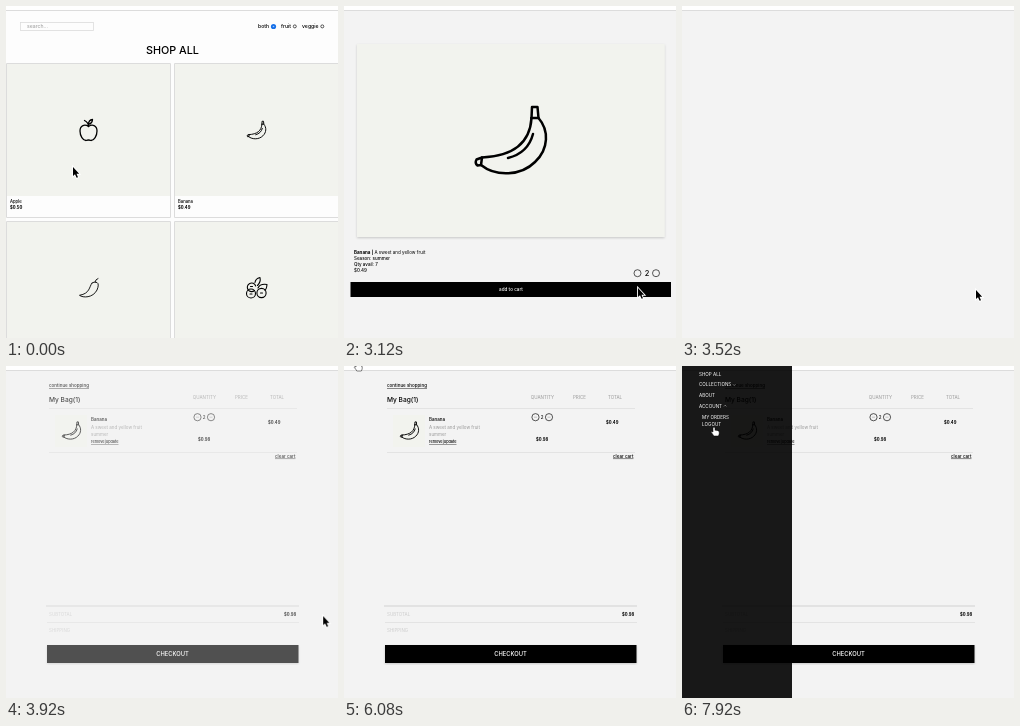
Animation, 332 px wide and 332 px high, one loop 8000 ms. Source, as an HTML page:

```html
<!DOCTYPE html>
<html lang="en">
<head>
<meta charset="utf-8">
<title>Shop walkthrough</title>
<style>
html, body { margin: 0; width: 100%; height: 100%; overflow: hidden; background: #f3f3f3; }
svg { display: block; width: 100vw; height: 100vh; }
text { font-family: Inter, "Liberation Sans", sans-serif; font-size: 4.5px; font-weight: 500; fill: #000; }
.m { text-anchor: middle; }
.b { font-weight: 700; }
.small { font-size: 4.2px; }
.label { font-size: 5.15px; }
.count { font-size: 7.5px; }
.grey { fill: #999; font-weight: 400; }
.pale { fill: #ccc; font-weight: 400; }
.u { text-decoration: underline; }
.white { fill: #fff; }
.menu text { fill: #fff; font-size: 4.6px; font-weight: 400; }
.tile { fill: #f2f3ee; }
.line { fill: none; stroke: #dcdcdc; }
.ring { fill: none; stroke: #111; stroke-width: .7; }
.icon { fill: none; stroke: #000; stroke-linecap: round; stroke-linejoin: round; }

/* One loop lasts 8 s, so 1% is 80 ms. */
.t { animation: 8s linear infinite; }
.home { animation-name: home; animation-timing-function: step-end; }
.product { animation-name: product; }
.cart { animation-name: cart; }
.drawer { animation-name: drawer; }
.menu { animation-name: menu; }
.account, .q0, .q1, .q2, .arrow, .hand { animation-timing-function: step-end; }
.account { animation-name: account; }
.q0 { animation-name: q0; }
.q1 { animation-name: q1; }
.q2 { animation-name: q2; }
.arrow { animation-name: arrow; }
.hand { animation-name: hand; }
.cursor { animation-name: cursor; animation-timing-function: ease-in-out; }

@keyframes home { 0% { opacity: 1 } 12%, 100% { opacity: 0 } }
@keyframes product { 0%, 12% { opacity: 0 } 14%, 40% { opacity: 1 } 43%, 100% { opacity: 0 } }
@keyframes cart { 0%, 45% { opacity: 0 } 51%, 100% { opacity: 1 } }
@keyframes drawer {
  0% { transform: scaleX(0) }
  76.5% { transform: scaleX(0); animation-timing-function: ease }
  82.75%, 100% { transform: scaleX(1) }
}
@keyframes menu { 0%, 78.5% { opacity: 0 } 86%, 100% { opacity: 1 } }
@keyframes account { 0% { opacity: 0 } 95%, 100% { opacity: 1 } }
@keyframes q0 { 0% { opacity: 1 } 27%, 100% { opacity: 0 } }
@keyframes q1 { 0% { opacity: 0 } 27% { opacity: 1 } 30%, 100% { opacity: 0 } }
@keyframes q2 { 0% { opacity: 0 } 30%, 100% { opacity: 1 } }
@keyframes arrow { 0% { opacity: 1 } 72%, 100% { opacity: 0 } }
@keyframes hand { 0% { opacity: 0 } 72%, 100% { opacity: 1 } }
@keyframes cursor {
  0%, 3.5% { transform: translate(67px, 161px) }
  10%, 15% { transform: translate(225px, 139px) }
  18%, 19% { transform: translate(233px, 257px) }
  23% { transform: translate(318px, 252px) }
  25%, 30% { transform: translate(313px, 266px) }
  33%, 39% { transform: translate(294px, 282px) }
  42%, 45% { transform: translate(294px, 284px) }
  51%, 53% { transform: translate(324px, 240px) }
  60%, 62% { transform: translate(197px, 47px) }
  67%, 68% { transform: translate(150px, 28px) }
  73%, 82% { transform: translate(13px, -4px) }
  90% { transform: translate(22px, 8px) }
  94%, 95% { transform: translate(30px, 41px) }
  99%, 100% { transform: translate(32px, 61px) }
}
</style>
</head>
<body>
<svg viewBox="0 0 332 332">
  <defs>
    <g id="banana" transform="translate(-167 -134)">
      <path d="M187.5 112L188 101h5.5l1 11C205 124 205 143 191 156C177 170 152 171 137 159"/>
      <path d="M187.5 112C186 137 170 150 138 151.5"/>
      <path d="M138 151.5L132.5 153.5Q130.5 157 133.5 159.5L137 159Z"/>
      <path d="M187.5 112H194.5M164 152Q184 147 189 128"/>
    </g>
    <filter id="soft" x="-5%" y="-5%" width="110%" height="112%">
      <feDropShadow dx="0" dy="1" stdDeviation="1" flood-opacity=".18"/>
    </filter>
  </defs>

  <rect width="332" height="332" fill="#f3f3f3"/>

  <g class="t home">
    <rect width="332" height="332" fill="#fdfdfd"/>
    <rect class="line" x="14.5" y="16.5" width="73" height="8" stroke-width=".8"/>
    <text class="grey label" x="21" y="22.2">search...</text>
    <text class="label" x="252" y="22.3">both</text>
    <text class="label" x="275" y="22.3">fruit</text>
    <text class="label" x="296" y="22.3">veggie</text>
    <circle cx="267.5" cy="20.5" r="2.6" fill="#1670e8"/>
    <circle cx="267.5" cy="20.5" r=".8" fill="#9cc4fa"/>
    <circle class="ring" cx="288.8" cy="20.4" r="1.5"/>
    <circle class="ring" cx="316.3" cy="20.4" r="1.5"/>
    <text class="m" x="166.5" y="48.2" style="font-size:10.8px">SHOP ALL</text>

    <path class="line" d="M.5 57.5H164.5V211.5H.5ZM168.5 57.5H333V211.5H168.5ZM.5 215.5H164.5V340H.5ZM168.5 215.5H333V340H168.5Z"/>
    <path class="tile" d="M1 58H164V190H1ZM169 58H332V190H169ZM1 216H164V332H1ZM169 216H332V332H169Z"/>
    <text class="small" x="4" y="197.4">Apple</text>
    <text class="small b" x="4" y="203.4">$0.50</text>
    <text class="small" x="172" y="197.4">Banana</text>
    <text class="small b" x="172" y="203.4">$0.49</text>

    <g class="icon" stroke-width="1.3">
      <path d="M82.5 120.5C79 118 74 119 74 125C74 130 77 134.5 80 134.5Q82.5 133.5 85 134.5C88 134.5 91 130 91 125C91 119 86 118 82.5 120.5Q82.5 116.5 78.5 114.5M82.5 118.5Q82.5 114 86.5 113.5Q86.5 117 82.5 118.5"/>
    </g>
    <use class="icon" href="#banana" transform="translate(250.5 124) scale(.265)" stroke-width="3.6"/>
    <g class="icon" stroke-width=".9">
      <path d="M86 277C83 281 84 287.5 73.5 289.3C77 292 87 292 91 284Q93.5 278 91 276.5Q88 275.3 86 277M89 276Q89.5 273.3 92 272.5"/>
    </g>
    <g class="icon" stroke-width="1.1">
      <circle cx="245" cy="287.5" r="4.5"/>
      <circle cx="255.5" cy="287" r="4.6"/>
      <path d="M248.5 284.5A4.3 4.3 0 1 1 249.7 280M249 276.5Q249.5 272.5 254 271.5Q255 276 251.5 279.5M252 282Q254 277.5 261 278.5Q260.5 284 258.5 284M244.5 280.5h2M244 288h2M254.5 287h2"/>
    </g>
  </g>

  <g class="t product">
    <rect class="tile" x="13" y="38" width="307.5" height="193" filter="url(#soft)"/>
    <use class="icon" href="#banana" transform="translate(167 134)" stroke-width="2.5"/>
    <text x="10" y="248.4" style="font-weight:400"><tspan class="b">Banana |</tspan> A sweet and yellow fruit</text>
    <text x="10" y="254.4">Season: summer</text>
    <text x="10" y="260.4">Qty avail: 7</text>
    <text x="10" y="266.4">$0.49</text>
    <circle class="ring" cx="293.5" cy="267.2" r="3.5"/>
    <circle class="ring" cx="312" cy="267.2" r="3.5"/>
    <g class="m">
      <text class="t count q0" x="303" y="270">0</text>
      <text class="t count q1" x="303" y="270">1</text>
      <text class="t count q2" x="303" y="270">2</text>
    </g>
    <rect x="6.5" y="276" width="320.5" height="15"/>
    <text class="m white" x="167" y="285" style="font-size:4.6px">add to cart</text>
  </g>

  <g class="t cart">
    <text class="u" x="43" y="21">continue shopping</text>
    <text x="43" y="36.4" style="font-size:6.6px">My Bag(1)</text>
    <g class="m">
      <text class="grey" x="198.5" y="33.4">QUANTITY</text>
      <text class="grey" x="235.5" y="33.4">PRICE</text>
      <text class="grey" x="271" y="33.4">TOTAL</text>
    </g>
    <path class="line" d="M43 42.5H291M43 86.5H291" stroke-width=".7"/>
    <rect class="tile" x="49" y="49" width="32" height="32"/>
    <use class="icon" href="#banana" transform="translate(65.5 64.5) scale(.26)" stroke-width="3.6"/>
    <text x="85" y="55.4">Banana</text>
    <text class="grey" x="85" y="63.4">A sweet and yellow fruit</text>
    <text class="grey" x="85" y="70.4">summer</text>
    <text class="u" x="85" y="77" style="font-size:3.8px">remove|update</text>
    <circle class="ring" cx="191.5" cy="51.2" r="3.6"/>
    <circle class="ring" cx="205" cy="51.2" r="3.6"/>
    <path class="ring" d="M190 51.2h3M203.5 51.2h3" stroke-opacity=".3"/>
    <text class="m" x="198.2" y="52.8">2</text>
    <text class="small b" x="192" y="75">$0.98</text>
    <text class="small b" x="262" y="58">$0.49</text>
    <text class="u" x="269" y="91.6">clear cart</text>
    <path class="line" d="M40 240H293" stroke-width="1.6"/>
    <path class="line" d="M41 256.5H293" stroke-width=".7"/>
    <text class="pale" x="43" y="249.9">SUBTOTAL</text>
    <text class="pale" x="43" y="266.3">SHIPPING</text>
    <text class="small b" x="278" y="249.9">$0.98</text>
    <rect x="41" y="279" width="251.5" height="18" filter="url(#soft)"/>
    <text class="m white" x="166.5" y="290.2" style="font-size:5.8px">CHECKOUT</text>
  </g>

  <rect width="332" height="4.5" fill="#fff"/>
  <path class="line" d="M0 4.5H332"/>

  <rect class="t drawer" width="110" height="332" fill-opacity=".9"/>
  <g class="t menu">
    <text x="17" y="9.7">SHOP ALL</text>
    <text x="17" y="20.4">COLLECTIONS</text>
    <text x="17" y="31">ABOUT</text>
    <text x="17" y="41.7">ACCOUNT</text>
    <path d="M51 18.3l1.2 1.2l1.2-1.2M42 40.4l1.2-1.2l1.2 1.2" fill="none" stroke="#ddd" stroke-width=".5"/>
    <g class="t account">
      <text x="20" y="52.5">MY ORDERS</text>
      <text x="20" y="60.4">LOGOUT</text>
    </g>
  </g>

  <g class="t cursor">
    <path class="t arrow" d="M0 0V9L2 7.3L3.6 10.8L5 10.2L3.5 6.8H6.2Z" stroke="#fff" stroke-width="1.8" paint-order="stroke"/>
    <path class="t hand" d="M-1 .8Q0-.6 1 .8V3.4Q2 2.6 2.6 3.6Q3.6 3 4 4Q5.2 3.6 5.2 5V6.5Q5 8 4.3 9H-.2Q-1.2 7.2-2.7 5.4Q-2.8 4-1 5Z" fill="#fff" stroke="#000" stroke-width=".5"/>
  </g>
</svg>
</body>
</html>
```
